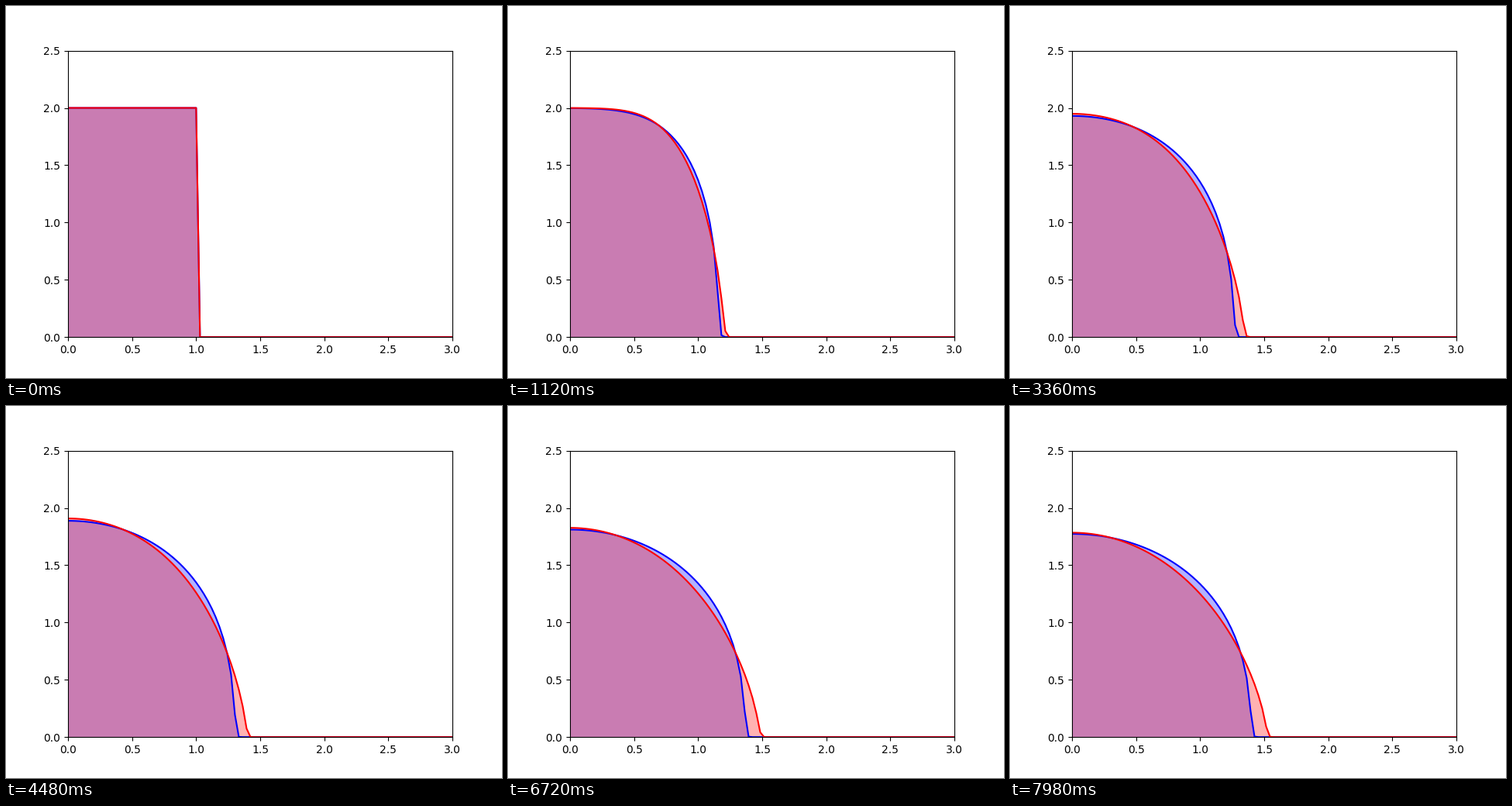
Animation of 640 by 480 pixels, one loop 8000 ms. Source, as a matplotlib script:

```python
import numpy as np
import matplotlib.pyplot as plt
from matplotlib.animation import FuncAnimation

LOOP, TICK, STEP = 8000, 40, 140   # ms
STEPS = LOOP // STEP + 1
SUB = 40                           # solver sub-steps per shown step

x = np.linspace(0, 3, 100)
dx = x[1] - x[0]


def spread(k, m):
    """Solve h_t = (k h^m h_x)_x from a block of height 2, symmetric at x = 0."""
    h = np.where(x <= 1 + dx / 4, 2.0, 0.0)
    history = [h.copy()]
    c = k / SUB / dx**2
    for _ in range(STEPS - 1):
        for _ in range(SUB):
            p = h**m
            flux = c * (p[1:] + p[:-1]) / 2 * np.diff(h)
            h[1:-1] += np.diff(flux)
            h[0] += 2 * flux[0]
            h[-1] -= 2 * flux[-1]
        history.append(h.copy())
    return history


def outline(h):
    xs = np.r_[0, x, 3]
    return np.column_stack([xs, np.r_[0, h, 0]])


fig, ax = plt.subplots(figsize=(6.4, 4.8), dpi=100)
ax.set_xlim(0, 3)
ax.set_ylim(0, 2.5)

layers = []
for color, k, m in (("blue", 0.00134, 2.5), ("red", 0.002, 1.5)):
    history = spread(k, m)
    line, = ax.plot(x, history[0], color=color, lw=1.5)
    fill = ax.fill_between(x, history[0], color=color, alpha=0.3, lw=0)
    layers.append((line, fill, history))


def update(i):
    step = min((i * TICK + TICK // 2) // STEP, STEPS - 1)
    artists = []
    for line, fill, history in layers:
        line.set_ydata(history[step])
        fill.set_verts([outline(history[step])])
        artists += [fill, line]
    return artists


anim = FuncAnimation(fig, update, frames=LOOP // TICK, interval=TICK,
                     repeat=True, repeat_delay=0, blit=False)
plt.show()
```
